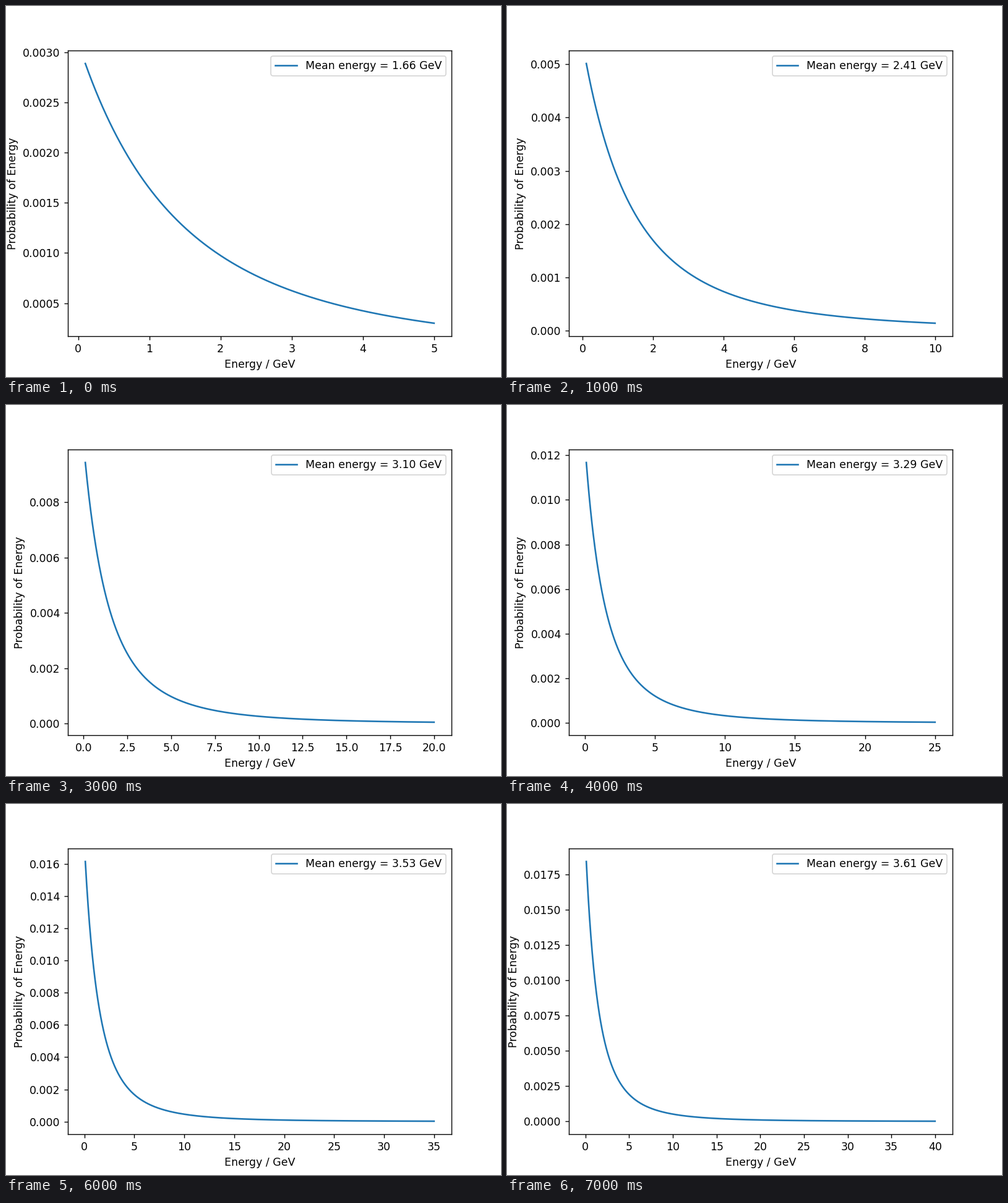
A matplotlib script that plays this animation: 800 by 600 pixels, repeating every 8000 ms.

```python
import matplotlib.pyplot as plt
import numpy as np
from matplotlib.animation import FuncAnimation

FRAMES = 8
STEP = 5        # GeV added to the energy range per frame
E_MIN = 0.1
POINTS = 1000

fig, ax = plt.subplots(figsize=(6.4, 4.8), dpi=125)


def spectrum(energy, e0=4.28, n=3.01, scale=854):
    """Falling power law, normalised to a discrete probability."""
    flux = (e0 + energy) ** -n / (1 + energy / scale)
    return flux / flux.sum()


def draw(i):
    energy = np.linspace(E_MIN, STEP * (i + 1), POINTS)
    prob = spectrum(energy)
    mean = np.sum(energy * prob)

    ax.clear()
    ax.plot(energy, prob, label=f"Mean energy = {mean:.2f} GeV")
    ax.set_xlabel("Energy / GeV")
    ax.set_ylabel("Probability of Energy")
    ax.legend(loc="upper right")
    return ax.lines


anim = FuncAnimation(fig, draw, frames=FRAMES, interval=1000,
                     init_func=lambda: draw(0), repeat=True, repeat_delay=0)
plt.show()
```
